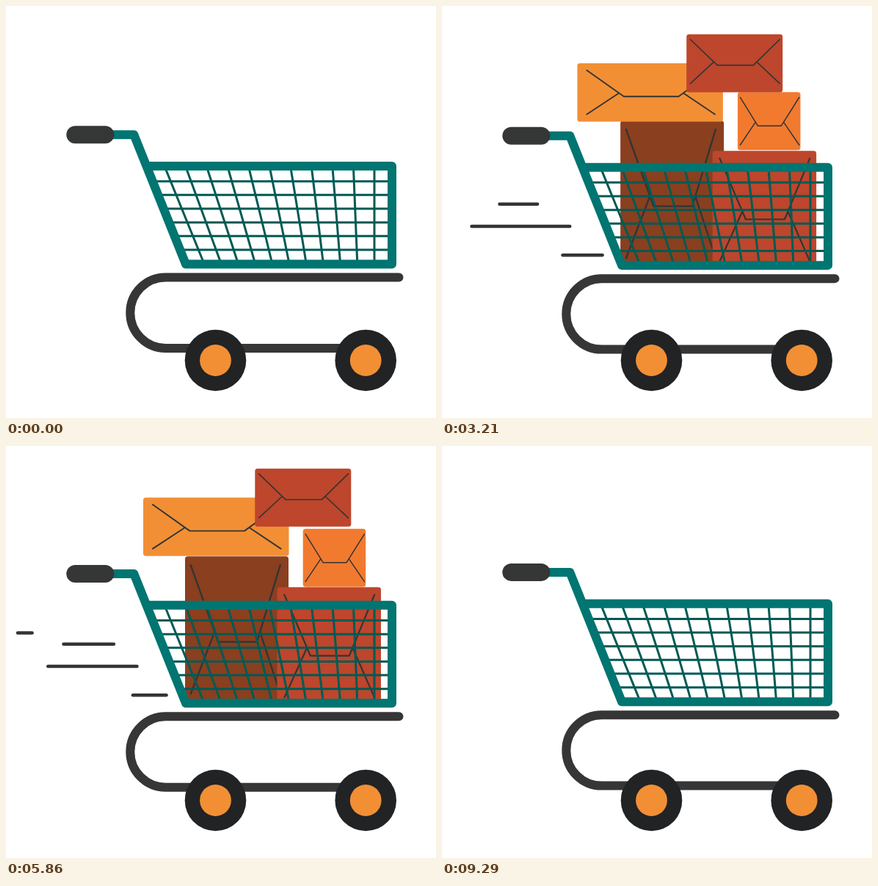
An HTML page that plays this animation: 586 by 561 pixels, repeating every 9370 ms.

```html
<!DOCTYPE html>
<html lang="en">
<head>
<meta charset="utf-8">
<title>Shopping cart</title>
<style>
  html, body { margin: 0; width: 100%; height: 100%; overflow: hidden; background: #fff; }
  svg { display: block; width: 586px; height: 561px; }
  .stroke { fill: none; stroke-linecap: round; stroke-linejoin: round; }
  .rail { stroke: #363636; stroke-width: 12; }
  .frame { stroke: #007571; stroke-width: 12; }
  .mesh { stroke: #005a54; stroke-width: 3; }
  .fold { stroke: #343434; }
  .dash { stroke: #343432; stroke-width: 4.6; }
  .tyre { fill: #212324; }
  .hub { fill: #f28f35; }
</style>
</head>
<body>
<svg viewBox="0 0 586 561">
  <defs>
    <clipPath id="basket"><path d="M194 218H526V351.5H245Z"/></clipPath>
  </defs>
  <g id="dashes"></g>
  <g id="lean">
    <g id="cart">
      <path class="stroke rail" d="M535.5 369.5H217.5a48.2 48.2 0 0 0 0 96.4H490"/>
      <g id="parcels"></g>
      <path id="mesh" class="stroke mesh" clip-path="url(#basket)"/>
      <path class="stroke frame" d="M140 175.2H174.3L245 351.5H526V218H192"/>
      <rect x="82.3" y="163.2" width="65" height="24" rx="12" fill="#353636"/>
    </g>
    <g id="wheels"></g>
  </g>
</svg>
<script>
const LOOP = 9370, FPS = 14, LAST = 130;
const $ = id => document.getElementById(id);

function add(parent, tag, attrs) {
  const el = document.createElementNS('http://www.w3.org/2000/svg', tag);
  for (const k in attrs) el.setAttribute(k, attrs[k]);
  return parent.appendChild(el);
}

const ramp = (t, from, to) => Math.min(1, Math.max(0, (t - from) / (to - from)));
const smooth = u => (1 - Math.cos(Math.PI * u)) / 2;
const ease = (t, from, to) => smooth(ramp(t, from, to));

// Basket mesh
let d = '';
for (let i = 0; i < 11; i++) d += `M${218 + 28.4 * i} 223L${268 + 23.4 * i} 346`;
for (let i = 0; i < 6; i++) d += `M194 ${238.7 + 18.65 * i}H526`;
$('mesh').setAttribute('d', d);

for (const cx of [285.5, 490.2]) {
  add($('wheels'), 'circle', { class: 'tyre', cx, cy: 482.5, r: 41.8 });
  add($('wheels'), 'circle', { class: 'hub', cx, cy: 482.5, r: 21.4 });
}

// flap: left, right, top, hinge and bottom as shares of the box
const parcels = [
  { x: 244, y: 151.5, w: 141, h: 199, fill: '#8a3f1f', line: 2.4, flap: [.055, .92, .06, .585, .94],
    drop: 653, leave: 8870, sway: [-1, 3.5] },
  { x: 369.5, y: 193.5, w: 141.5, h: 158, fill: '#bd462c', line: 2.2, flap: [.07, .937, .065, .59, .95],
    drop: 773, leave: 8581, sway: [-1, 2.5] },
  { x: 404.7, y: 114, w: 85.5, h: 79, fill: '#f17a2f', line: 1.5, flap: [.04, .98, .09, .58, .91],
    drop: 893, leave: 8292, sway: [-2, 2] },
  { x: 187, y: 71.5, w: 198.5, h: 79.5, fill: '#f28f35', line: 1.9, flap: [.065, .945, .12, .57, .875],
    drop: 1013, leave: 8003, sway: [-3, 5.5] },
  { x: 339.3, y: 32, w: 131, h: 79, fill: '#bd462c', line: 1.6, flap: [.04, .97, .09, .535, .85],
    drop: 1170, leave: 7713, sway: [-7, 5.5] }
];

for (const p of parcels) {
  const { w, h } = p, [l, r, top, hinge, low] = p.flap;
  const at = (x, y) => `${(x - .5) * w} ${(y - .5) * h}`;
  const a = .32, b = .695, k = .87;
  const joint = top + (hinge - top) * k;
  p.g = add($('parcels'), 'g');
  add(p.g, 'rect', { x: -w / 2, y: -h / 2, width: w, height: h, rx: 3.5, fill: p.fill });
  add(p.g, 'path', {
    class: 'stroke fold', 'stroke-width': p.line,
    d: `M${at(l, top)}L${at(a, hinge)}L${at(b, hinge)}L${at(r, top)}` +
       `M${at(l + (a - l) * k, joint)}L${at(l, low)}` +
       `M${at(r + (b - r) * k, joint)}L${at(r, low)}`
  });
}

// Speed lines grow leftwards from their right end, then vanish at the left
const HALF = 380, runs = [2450, 3908, 5151, 6530, 7913];
const dashes = [
  { y: 254.5, from: 16, to: 154, lag: 0 },
  { y: 269.7, from: 78.5, to: 188.5, lag: .48 },
  { y: 300, from: 40.5, to: 178.5, lag: .98 },
  { y: 339.3, from: 163.5, to: 218.5, lag: 1.03 }
];
for (const s of dashes) s.el = add($('dashes'), 'path', { class: 'stroke dash' });

function drawDash(s, t) {
  const phase = runs.map(r => (t - r) / HALF - s.lag).find(p => p > 0 && p < 2);
  if (phase === undefined) return s.el.setAttribute('d', '');
  const len = s.to - s.from;
  const left = s.to - len * Math.min(1, phase);
  const right = s.to - len * Math.max(0, phase - 1);
  s.el.setAttribute('d', `M${left} ${s.y}H${right}`);
}

function drawParcel(p, t, sway) {
  const grow = 1 - (1 - ramp(t, p.drop, p.drop + 346)) ** 3;
  const fall = ramp(t, p.drop, p.drop + 557) ** 2;
  const out = ramp(t, p.leave, p.leave + 350);
  const scale = grow * (1 - out ** 3);
  const x = p.x + p.w / 2 + p.sway[0] * sway;
  const y = p.y + p.h / 2 + p.sway[1] * sway - 80 * (1 - fall) - 7 * out * out;
  p.g.setAttribute('transform', `translate(${x} ${y}) scale(${scale})`);
  p.g.setAttribute('visibility', scale > .01 ? 'visible' : 'hidden');
}

function draw(t) {
  const lean = ease(t, 250, 1500) - ease(t, 2150, 2850);
  const sway = 1.5 * (ease(t, 2600, 2900) - ease(t, 2900, 3600));
  const bob = -3.4 * Math.sin(2 * Math.PI * 1.1 * t / 1000);
  $('lean').setAttribute('transform', `rotate(${-17.4 * lean} 285.5 482.5)`);
  $('cart').setAttribute('transform', `translate(0 ${bob * (1 - lean) + lean + sway})`);
  for (const p of parcels) drawParcel(p, t, sway);
  for (const s of dashes) drawDash(s, t);
}

const start = performance.now();
function tick() {
  const ms = (performance.now() - start) % LOOP;
  const step = Math.min(LAST, Math.floor((ms + 5) * FPS / 1000));
  draw(step * 1000 / FPS);
  requestAnimationFrame(tick);
}
tick();
</script>
</body>
</html>
```
